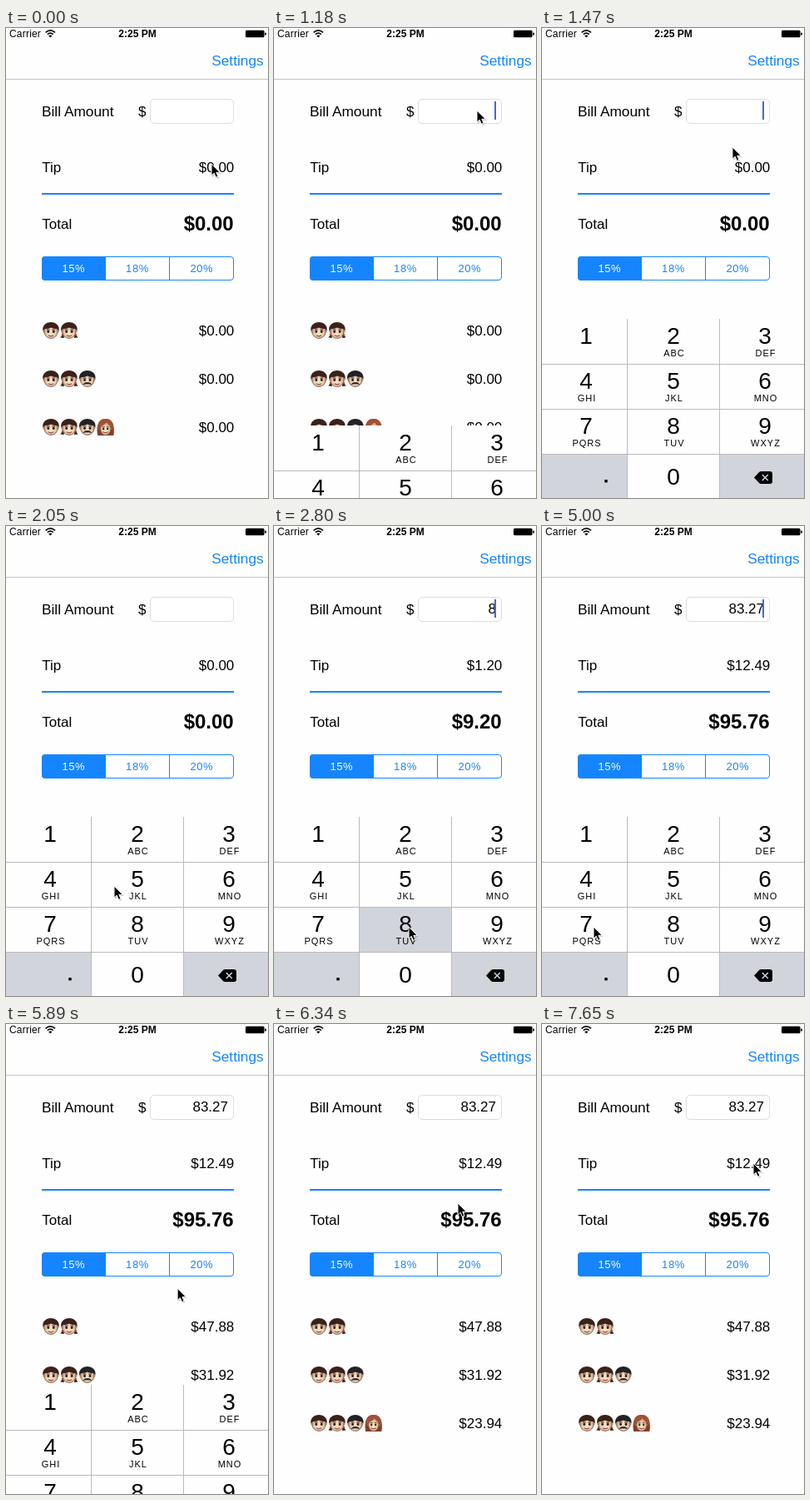
Animation, 315 px wide and 564 px high, one loop 8000 ms. Source, as an HTML page:

```html
<!DOCTYPE html>
<html>
<head>
<meta charset="utf-8">
<style>
  html, body { margin: 0; width: 100%; height: 100%; overflow: hidden; background: #fefefe; }
  svg { display: block; width: 315px; height: 564px; font: 17px "Liberation Sans", Arial, sans-serif; }
  .end { text-anchor: end; }
  .mid { text-anchor: middle; }
  .blue { fill: #1585ff; }
  .line { stroke: #1585ff; }
  .bold { font-weight: bold; }
  .label { font-size: 17.3px; }
  .seg { font-size: 13px; letter-spacing: .6px; text-anchor: middle; }
  .digit { font-size: 28px; text-anchor: middle; }
  .letters { font-size: 11px; letter-spacing: 1px; text-anchor: middle; }
  .hair { fill: #3b2119; }
</style>
</head>
<body>
<svg viewBox="0 0 315 564">
  <defs>
    <radialGradient id="skin" cy=".6">
      <stop offset=".45" stop-color="#f3dcc0"/><stop offset="1" stop-color="#cfa57f"/>
    </radialGradient>
    <g id="face">
      <ellipse cy="1.5" rx="9.6" ry="2.4" fill="#c99a74"/>
      <ellipse cy="1.2" rx="8.2" ry="8.2" fill="url(#skin)" stroke="#6b4a37" stroke-width=".8"/>
      <path d="M-5-.9h3.600M1.400-.9H5" stroke="#33211a" stroke-width="1"/>
      <circle cx="-3.200" cy="1.500" r="1.400" fill="#20140f"/>
      <circle cx="3.200" cy="1.500" r="1.400" fill="#20140f"/>
    </g>
    <path id="smile" d="M-3 5.800Q0 7.800 3 5.800" fill="none" stroke="#8e4438" stroke-width="1.200"/>
    <path id="cap" d="M-9.500 1C-11-6-6-10 0-10S11-6 9.500 1L7.500-2Q3-2 0-3.500-4-1.500-7.500-2z"/>
    <g id="boy">
      <use href="#face"/><use href="#smile"/><use href="#cap" class="hair"/>
    </g>
    <g id="girl">
      <path class="hair" d="M-7 3l-3.500 5.500L-6 9zM7 3l3.500 5.500L6 9z"/>
      <use href="#face"/><use href="#smile"/><use href="#cap" class="hair"/>
      <circle cx="-8" cy="5" r="1.200" fill="#c8434a"/><circle cx="8" cy="5" r="1.200" fill="#c8434a"/>
    </g>
    <g id="man">
      <use href="#face"/>
      <use href="#cap" fill="#222126"/>
      <path d="M-5.500 7Q-3 3.400 0 4.200 3 3.400 5.500 7 2 6.200 0 6.400-2 6.200-5.500 7z" fill="#222126"/>
    </g>
    <g id="woman">
      <path d="M-9.500 10C-11 4-11-10 0-10S11 4 9.500 10z" fill="#823f2c"/>
      <use href="#face" transform="translate(0 .6) scale(.76 .95)"/><use href="#smile"/>
      <path d="M-9 4C-11-6-6-10 0-10S11-6 9 4L6-1.500Q2-3 1.500-6.500-2-2-6.500-1z" fill="#a35138"/>
    </g>
  </defs>

  <rect width="315" height="564" fill="#fefefe"/>
  <text x="4" y="11.2" font-size="12" letter-spacing=".2">Carrier</text>
  <path d="M47.600 5.300Q53.300.5 59 5.300M49.800 7.600Q53.300 4.700 56.800 7.600" fill="none" stroke="#000" stroke-width="1.600"/>
  <path d="M51.200 9.200Q53.300 7.600 55.400 9.200L53.300 11.600z"/>
  <text class="mid bold" x="158" y="11.2" font-size="12">2:25 PM</text>
  <rect x="288" y="2.800" width="22.500" height="8.400" rx="1.500"/>
  <rect x="311.200" y="5.500" width="1.600" height="3.200" rx=".8"/>

  <text class="end blue label" x="309.700" y="44.800">Settings</text>
  <path d="M0 61.500H315" stroke="#c4c4c6"/>

  <text class="label" x="43" y="105.600">Bill Amount</text>
  <text x="159" y="105.600">$</text>
  <rect x="173.500" y="85.500" width="100" height="29" rx="4.500" fill="#fff" stroke="#dcdcdd"/>
  <text class="end" id="bill" x="267" y="105.400"></text>
  <rect id="caret" x="265" y="88" width="2" height="22" fill="#4168d8"/>
  <text x="43.300" y="172.700">Tip</text>
  <text class="end" id="tip" x="274.300" y="172.700"></text>
  <rect class="blue" x="43" y="198" width="231" height="2"/>
  <text x="43.300" y="240.700">Total</text>
  <text class="end bold" id="total" x="273.700" y="242.900" font-size="24"></text>

  <rect class="line" x="43.500" y="274.500" width="230" height="28" rx="3.500" fill="#fff"/>
  <path class="blue" d="M120 274H47q-4 0-4 4v21q0 4 4 4h73z"/>
  <path class="line" d="M196.500 275v28"/>
  <text class="seg" x="81.300" y="292.900" fill="#fff">15%</text>
  <text class="seg blue" x="158" y="292.900">18%</text>
  <text class="seg blue" x="235.300" y="292.900">20%</text>

  <g id="splits"></g>
  <g id="keyboard">
    <rect width="315" height="215" fill="#fefefe"/>
    <path d="M0 162H102V215H0zM214 162H315V215H214z" fill="#d1d5db"/>
    <rect id="pressed" x="103" y="109" width="110" height="53" fill="#d1d5db"/>
    <path d="M102.500 0V215M213.500 0V215M0 54.500H315M0 108.500H315M0 162.500H315" stroke="#b9babd"/>
    <g id="keys"></g>
    <rect x="75.300" y="193" width="3.400" height="3.400"/>
    <path d="M255 190.500l6-6.500q1-1 2.500-1H274q3 0 3 3v9q0 3-3 3H263.500q-1.500 0-2.500-1z"/>
    <path d="M264.800 187l7 7m0-7l-7 7" stroke="#d1d5db" stroke-width="1.500"/>
  </g>
  <g id="cursor">
    <path d="M1 2V16l3.300-3 2.200 5 2.800-1.200-2.100-4.800h4.600z" opacity=".2"/>
    <path d="M0 0V14.200l3.200-3 2.200 5.100 2.600-1.100-2.200-4.900h4.500z" stroke="#fff" stroke-width="1"/>
  </g>
</svg>
<script>
const LOOP = 8000, STEP = 147.1;
const BOTTOM = 564, KEYBOARD = 215, ROW = 54;
const EDIT_START = 1020, EDIT_END = 5730, SLIDE = 360, GLIDE = 750;
const $ = id => document.getElementById(id);

const taps = [
  { time: 2700, key: "8" }, { time: 3670, key: "3" }, { time: 4260, key: "." },
  { time: 4550, key: "2" }, { time: 4850, key: "7" }
];

// Where the pointer rests on a key.
function keySpot(key) {
  if (key === ".") return { x: 69, y: 490 };
  const i = key - 1;
  return { x: 62 + i % 3 * 100, y: 373 + Math.floor(i / 3) * ROW };
}

const stops = [
  { time: 0, x: 247, y: 163 },
  { time: 900, x: 244, y: 99 },
  { time: 2050, x: 130, y: 432 },
  ...taps.map(tap => ({ time: tap.time, ...keySpot(tap.key) })),
  { time: 3960, ...keySpot("2") },
  { time: 5800, x: 205, y: 325 },
  { time: 6320, x: 221, y: 215 },
  { time: 6920, x: 244, y: 245 },
  { time: 7640, x: 254, y: 167 }
].sort((a, b) => a.time - b.time);

function ease(t, start, length) {
  const f = Math.min(1, Math.max(0, (t - start) / length));
  return f * f * (3 - 2 * f);
}

// Each stop pulls the pointer over from wherever it was.
function pointer(t) {
  return stops.reduce((from, to) => {
    const length = Math.min(GLIDE, to.time - from.time);
    const f = ease(t, to.time - length, length);
    return { time: to.time, x: from.x + (to.x - from.x) * f, y: from.y + (to.y - from.y) * f };
  });
}

const people = ["boy", "girl", "man", "woman"];
const shares = [2, 3, 4];
$("splits").innerHTML = shares.map((n, row) => {
  const y = 363 + row * 58;
  const faces = people.slice(0, n)
    .map((who, i) => `<use href="#${who}" x="${54 + i * 21.9}" y="${y}"/>`).join("");
  return `${faces}<text class="end" id="split${n}" x="274.3" y="${y + 5.7}"></text>`;
}).join("");

const letters = ["", "ABC", "DEF", "GHI", "JKL", "MNO", "PQRS", "TUV", "WXYZ"];
const columns = [53, 158, 268];
$("keys").innerHTML = letters.map((word, i) => {
  const x = columns[i % 3], y = 30 + Math.floor(i / 3) * ROW;
  return `<text class="digit" x="${x}" y="${y}">${i + 1}</text>
    <text class="letters" x="${x + 1}" y="${y + 15}">${word}</text>`;
}).join("") + `<text class="digit" x="158" y="199">0</text>`;

const money = v => "$" + v.toFixed(2);
const show = (id, on) => $(id).setAttribute("visibility", on ? "visible" : "hidden");
const move = (id, x, y) => $(id).setAttribute("transform", `translate(${x} ${y})`);

function draw(now) {
  // The screen refreshes in coarse, even steps.
  const t = Math.floor((now % LOOP + 10) / STEP) * STEP;
  const done = taps.filter(tap => tap.time <= t);
  const text = done.map(tap => tap.key).join("");
  const tip = text * .15, total = +text + tip;

  $("bill").textContent = text;
  $("tip").textContent = money(tip);
  $("total").textContent = money(total);
  for (const n of shares) $("split" + n).textContent = money(total / n);

  const lastEdit = done.length ? done.at(-1).time : EDIT_START + 150;
  show("caret", t >= EDIT_START + 150 && t < EDIT_END && (t - lastEdit) % 1000 < 560);
  show("pressed", text === "8" && t - lastEdit < STEP);

  const raised = ease(t, EDIT_START, SLIDE) - ease(t, EDIT_END, SLIDE);
  move("keyboard", 0, Math.round(BOTTOM - KEYBOARD * raised));
  const { x, y } = pointer(t);
  move("cursor", x, y);
  requestAnimationFrame(draw);
}
requestAnimationFrame(draw);
</script>
</body>
</html>
```
